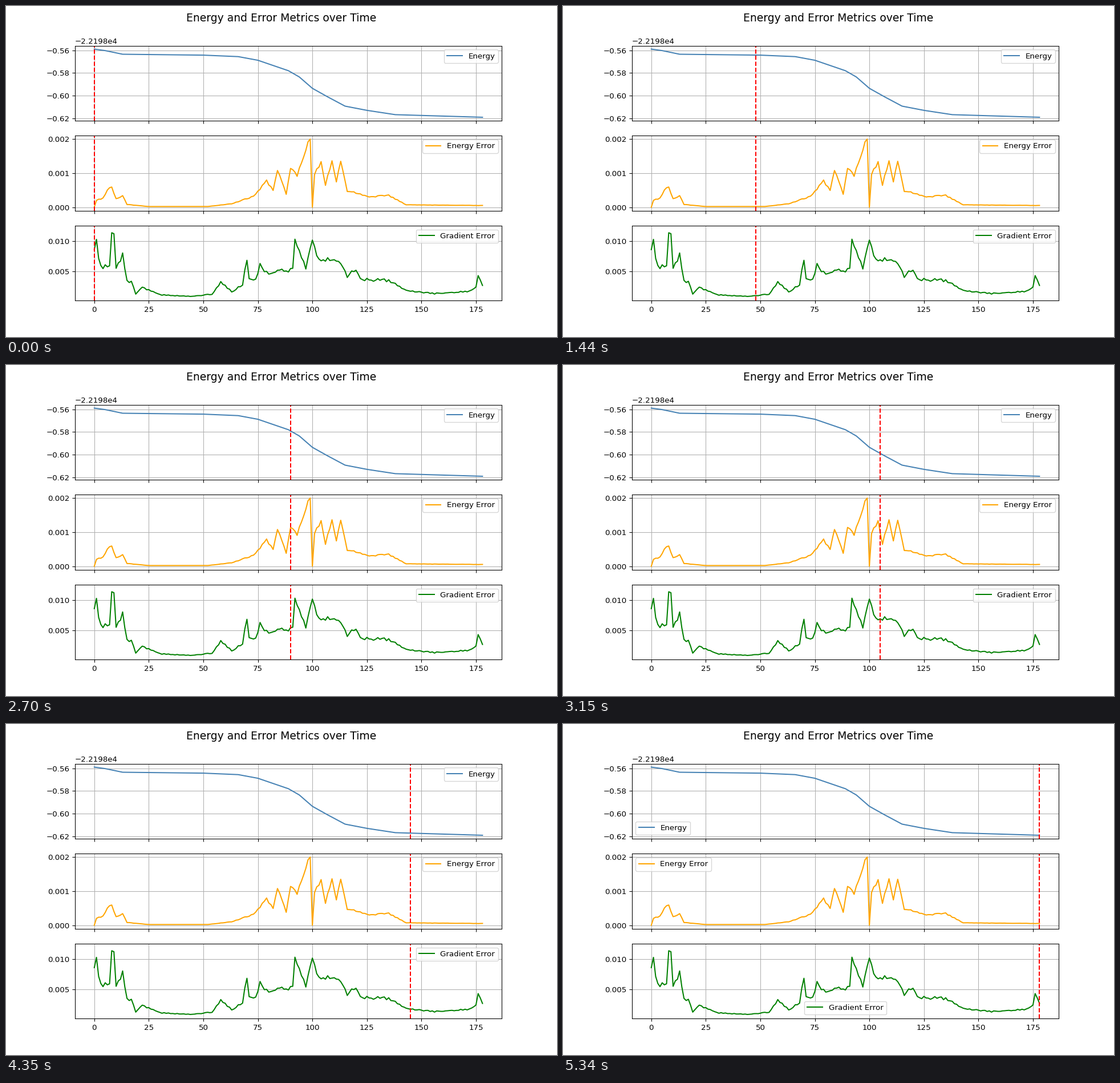
These frames come from a looping animation (966x580 px, 5.37 s). A matplotlib script:

```python
import numpy as np
import matplotlib.pyplot as plt
from matplotlib.animation import FuncAnimation

plt.rcParams["font.family"] = "DejaVu Sans"

STEPS = 179
INTERVAL = 30
DPI = 96.6
steps = np.arange(STEPS)
rng = np.random.default_rng(4)


def curve(*points):
    """Straight lines through (step, value) key points."""
    return np.interp(steps, *zip(*points))


def noisy(trend, amount):
    """Relative jitter that never passes the trend's peak."""
    jitter = 1 + amount * rng.uniform(-1, 1, STEPS)
    return np.minimum(trend * jitter, trend.max())


# Slow start, long plateau, steep descent, settled end
energy = -22198 - 1e-3 * curve(
    (0, 559), (5, 560.3), (13, 563.5), (50, 564.3), (66, 565.6), (75, 568.8),
    (89, 578), (94, 583.5), (100, 593.5), (106, 600), (115, 609.2),
    (125, 612.9), (138, 616.7), (178, 619))

# Small bump, quiet stretch, climb to the reset at step 100, decay
energy_error = 1e-3 * noisy(curve(
    (0, 0), (1, .2), (4, .27), (7.5, .65), (10, .24), (13, .33), (15, .08),
    (25, .02), (52, .02), (63, .1), (73, .32), (79, .78), (82, .5), (84, 1.1),
    (88, .4), (90, 1.2), (93, .95), (99, 2), (100, 0), (101, 1), (104, 1.3),
    (106, .65), (109, 1.4), (111, .75), (113, 1.3), (116, .49), (126, .3),
    (135, .35), (143, .07), (178, .05)), .06)

gradient_error = 1e-3 * noisy(curve(
    (0, 8.6), (1, 9.7), (3, 5.6), (7, 6), (8, 12), (9, 12), (10, 5.3),
    (13, 7.9), (15, 3.3), (17, 3.3), (19, 1.2), (22, 2.3), (30, 1.1),
    (45, .8), (54, 1.2), (58, 3.2), (63, 1.6), (68, 2.8), (70, 6.9),
    (71, 3.7), (74, 3.5), (76, 6.4), (78, 4.8), (91, 5.2), (92, 9.7),
    (97, 5.5), (100, 10), (102, 7.4), (113, 6.2), (116, 4), (120, 5.5),
    (122, 3.6), (135, 3.5), (143, 1.8), (156, 1.3), (172, 1.7), (175, 2.3),
    (176, 4.4), (178, 2.5)), .07)

# Height is a hair over 580 px so that rounding down keeps every row
fig, axes = plt.subplots(3, 1, sharex=True, figsize=(10, 580.005 / DPI), dpi=DPI)
fig.suptitle("Energy and Error Metrics over Time", fontsize=14)

panels = [
    (energy, "Energy", "steelblue", (-22198.622, -22198.556)),
    (energy_error, "Energy Error", "orange", (-.0001, .0021)),
    (gradient_error, "Gradient Error", "green", (.000135, .012565)),
]
cursors = []
for ax, (values, label, color, limits) in zip(axes, panels):
    ax.plot(steps, values, color=color, label=label)
    cursors.append(ax.axvline(0, color="red", linestyle="--"))
    ax.set_ylim(limits)
    ax.grid(True)
    # "best" lets the legend jump aside once the cursor reaches it
    ax.legend(loc="best")


def update(step):
    for cursor in cursors:
        cursor.set_xdata([step, step])
    return cursors


anim = FuncAnimation(fig, update, frames=STEPS, interval=INTERVAL,
                     repeat=True, repeat_delay=0, blit=False)
plt.show()
```
